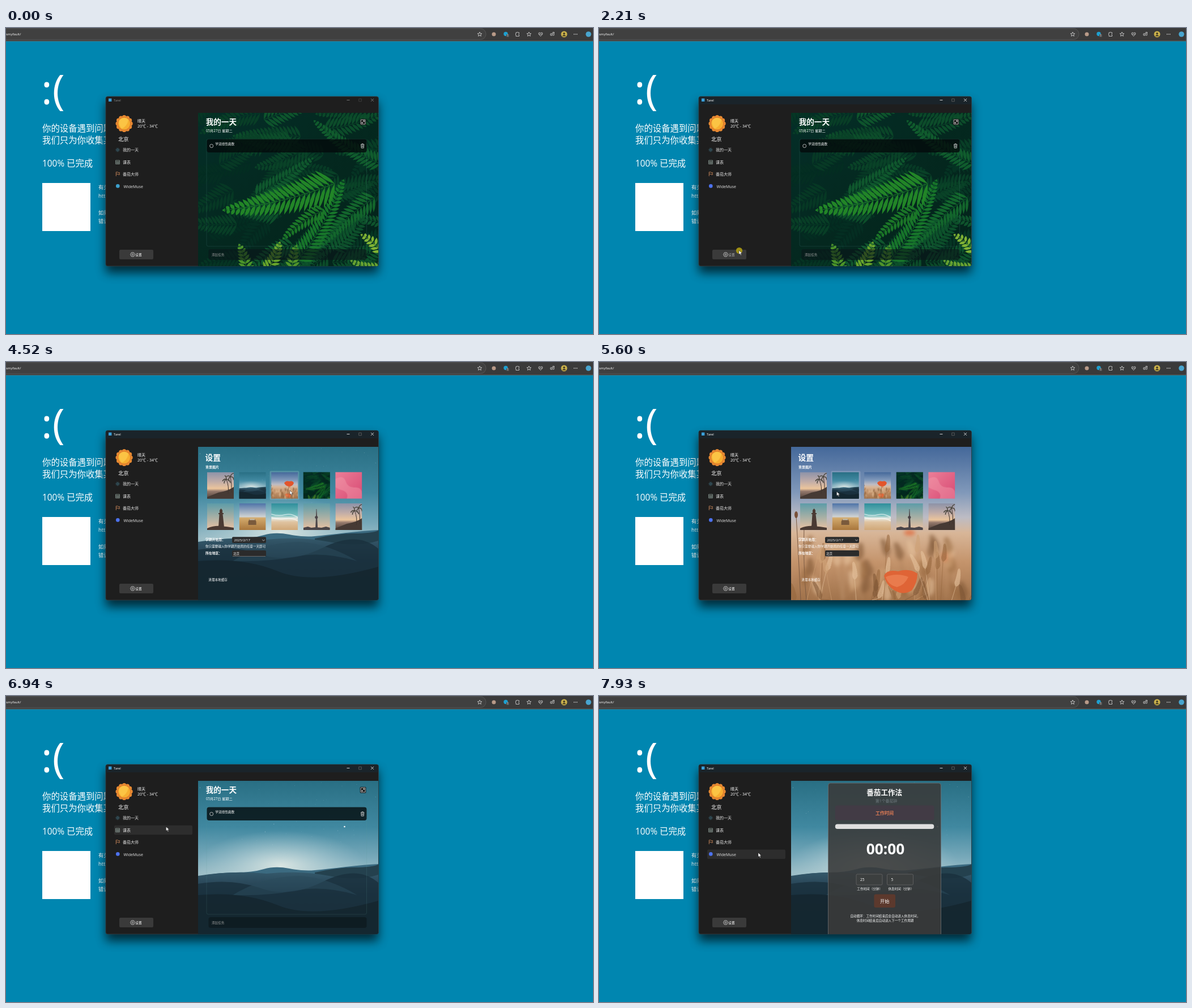
Write an HTML page that moves like this. It is 1036 px wide and 541 px high and loops after 8 s.

```html
<!DOCTYPE html>
<html lang="en">
<head>
<meta charset="utf-8">
<title>To-do app demo</title>
<style>
html, body { margin: 0; width: 100%; height: 100%; overflow: hidden; background: #0086b0; }
svg { display: block; }
#stage { width: 100%; height: 100%; font-family: "Open Sans", "Noto Sans CJK SC", "Noto Sans CJK", sans-serif; fill: #fff; }
text { white-space: pre; }
.b { font-weight: 700; }
.m { text-anchor: middle; }
.line { fill: none; stroke: #ddd; stroke-width: .8; }
.nav { font-size: 7px; fill: #e4e4e4; }
.small { font-size: 5.6px; }
.row { fill: #2d2d2d; }
.lit { fill: #fff; fill-opacity: .16; }
.soft { filter: blur(3px); }
.shadow { filter: blur(9px); }

.focus, .idle, .ai, .pressed, .fern, .fernThumb, .wheat, .lit, .row, .tap, .arrow {
  animation: 8s step-end infinite;
}
.focus { animation-name: focus; }
.idle { animation-name: idle; }
.ai { animation-name: ai; }
.pressed { animation-name: pressed; }
.fern { animation-name: fern; }
.fernThumb { animation-name: fernThumb; }
.wheat { animation-name: wheat; }
.lit2 { animation-name: lit2; }
.lit3 { animation-name: lit3; }
.row1 { animation-name: row1; }
.row2 { animation-name: row2; }
.row3 { animation-name: row3; }
.row4 { animation-name: row4; }
.tap { animation-name: tap; }
.arrow { animation-name: arrow; }
.day { animation: day 8s infinite; }
.settings { animation: settings 8s infinite; }
.table { animation: table 8s infinite; }
.timer { animation: timer 8s infinite; }
.pointer { animation: pointer 8s ease-in-out infinite; }

@keyframes focus { 0% { opacity: 0 } 1.1%, 100% { opacity: 1 } }
@keyframes idle { 0% { opacity: 1 } 1.1%, 100% { opacity: 0 } }
@keyframes ai { 0% { fill: #3ca0cc } 8%, 100% { fill: #4d72ee } }
@keyframes pressed { 0% { fill: #fff } 27.5% { fill: #aaa } 29.3%, 100% { fill: #fff } }
@keyframes fern { 0% { opacity: 1 } 46.5%, 100% { opacity: 0 } }
@keyframes fernThumb { 0% { opacity: 0 } 46.5%, 100% { opacity: 1 } }
@keyframes wheat { 0% { opacity: 0 } 59.1% { opacity: 1 } 71.5%, 100% { opacity: 0 } }
@keyframes lit2 { 0% { opacity: 0 } 42% { opacity: 1 } 50% { opacity: 0 } 69.6% { opacity: 1 } 73%, 100% { opacity: 0 } }
@keyframes lit3 { 0% { opacity: 0 } 50.6% { opacity: 1 } 64%, 100% { opacity: 0 } }
@keyframes row1 { 0% { opacity: 0 } 75% { opacity: 1 } 86.3%, 100% { opacity: 0 } }
@keyframes row2 { 0% { opacity: 0 } 86.3% { opacity: 1 } 93.5%, 100% { opacity: 0 } }
@keyframes row3 { 0% { opacity: 0 } 93.5% { opacity: 1 } 98%, 100% { opacity: 0 } }
@keyframes row4 { 0% { opacity: 0 } 98%, 100% { opacity: 1 } }
@keyframes arrow { 0% { opacity: 0 } 7.1%, 100% { opacity: 1 } }
@keyframes tap {
  0% { opacity: 0 } 27.5% { opacity: 1 } 29.3% { opacity: 0 }
  45.7% { opacity: 1 } 47.3% { opacity: 0 } 58.2% { opacity: 1 } 60% { opacity: 0 }
  70.4% { opacity: 1 } 72% { opacity: 0 } 77.6% { opacity: 1 } 79.2% { opacity: 0 }
  87% { opacity: 1 } 88.4% { opacity: 0 } 93.8% { opacity: 1 } 95.2%, 100% { opacity: 0 }
}
@keyframes day {
  0% { opacity: 1; transform: none; animation-timing-function: step-end }
  29.4% { opacity: 0; transform: translateY(40px); animation-timing-function: step-end }
  78.5% { opacity: 0; transform: translateY(40px); animation-timing-function: cubic-bezier(.1,.9,.2,1) }
  83% { opacity: 1; transform: none; animation-timing-function: step-end }
  87.5%, 100% { opacity: 0; transform: none }
}
@keyframes settings {
  0%, 29.4% { opacity: 0; transform: translateY(40px); animation-timing-function: cubic-bezier(.1,.9,.2,1) }
  34% { opacity: 1; transform: none; animation-timing-function: step-end }
  78.5%, 100% { opacity: 0; transform: none }
}
@keyframes table {
  0%, 87.5% { opacity: 0; transform: translateY(40px); animation-timing-function: cubic-bezier(.1,.9,.2,1) }
  90% { opacity: 1; transform: none; animation-timing-function: step-end }
  94.3%, 100% { opacity: 0; transform: none }
}
@keyframes timer {
  0%, 94.3% { opacity: 0; transform: translateY(40px); animation-timing-function: cubic-bezier(.1,.9,.2,1) }
  98%, 100% { opacity: 1; transform: none }
}
@keyframes pointer {
  0%, 7.1% { transform: translate(617px, 366px) }
  16.6%, 17.5% { transform: translate(258px, 334px) }
  20% { transform: translate(228px, 418px) }
  22.6%, 31% { transform: translate(247px, 393px) }
  44%, 49% { transform: translate(427px, 231px) }
  51.6%, 54.9% { transform: translate(497px, 223px) }
  56.4%, 63.2% { transform: translate(501px, 227px) }
  65%, 67.4% { transform: translate(458px, 227px) }
  67.5%, 69.2% { transform: translate(453px, 223px) }
  69.9%, 72% { transform: translate(419.5px, 229px) }
  75.9%, 86% { transform: translate(262px, 214px) }
  86.7%, 93.4% { transform: translate(282.5px, 231px) }
  93.7%, 97% { transform: translate(283px, 256px) }
  99%, 100% { transform: translate(281px, 277px) }
}
</style>
</head>
<body>
<svg id="stage" viewBox="0 0 1036 541" preserveAspectRatio="none">
<defs>
  <clipPath id="pane"><path d="M339 150H657V418q0 3-3 3H339z"/></clipPath>
  <linearGradient id="forest" x2="1" y2="1"><stop stop-color="#042e28"/><stop offset=".5" stop-color="#04281f"/><stop offset="1" stop-color="#03231a"/></linearGradient>
  <linearGradient id="dusk" x2="0" y2="1"><stop stop-color="#296f84"/><stop offset=".3" stop-color="#4088a0"/><stop offset=".5" stop-color="#78a9ba"/><stop offset=".6" stop-color="#9bbdc6"/></linearGradient>
  <radialGradient id="glow"><stop stop-color="#e8eee8" stop-opacity=".85"/><stop offset="1" stop-color="#b8d4da" stop-opacity="0"/></radialGradient>
  <linearGradient id="sand" x2="0" y2="1"><stop stop-color="#34586a"/><stop offset=".35" stop-color="#20394a"/><stop offset="1" stop-color="#15262f"/></linearGradient>
  <linearGradient id="field" x2="0" y2="1"><stop stop-color="#44689a"/><stop offset=".3" stop-color="#8199ba"/><stop offset=".46" stop-color="#bdbcc4"/><stop offset=".56" stop-color="#d8b698"/><stop offset=".75" stop-color="#c4946c"/><stop offset="1" stop-color="#a1734c"/></linearGradient>
  <linearGradient id="sunset" x2="0" y2="1"><stop stop-color="#8d93a8"/><stop offset=".35" stop-color="#c0aca8"/><stop offset=".62" stop-color="#ecc59c"/><stop offset=".72" stop-color="#94796c"/><stop offset="1" stop-color="#4d3f38"/></linearGradient>
  <linearGradient id="haze" x2="0" y2="1"><stop stop-color="#5d9ca8"/><stop offset="1" stop-color="#ecc2a2"/></linearGradient>
  <linearGradient id="rose" x2="1" y2="1"><stop stop-color="#ec7f98"/><stop offset="1" stop-color="#d84a74"/></linearGradient>
  <linearGradient id="plain" x2="0" y2="1"><stop stop-color="#4f74a8"/><stop offset=".5" stop-color="#cfd2d2"/><stop offset=".55" stop-color="#d3aa6c"/><stop offset="1" stop-color="#a8763c"/></linearGradient>
  <linearGradient id="sea" x2="0" y2="1"><stop stop-color="#2f8f9c"/><stop offset=".45" stop-color="#74bcbc"/><stop offset=".56" stop-color="#e8ebe4"/><stop offset=".7" stop-color="#dfc3a0"/><stop offset="1" stop-color="#d0a878"/></linearGradient>

  <g id="fern"><path fill="url(#forest)" d="M339 150h318v271H339z"/></g>
  <g id="dunes">
    <path fill="url(#dusk)" d="M339 150h318v271H339z"/>
    <ellipse cx="485" cy="300" rx="150" ry="62" fill="url(#glow)"/>
    <path fill="#3b6a80" d="M339 319Q375 312 405 312T455 306T500 305T545 308T600 302T657 297V350H339z"/>
    <path fill="#24414e" d="M545 312Q585 303 615 303T657 298V340H545z"/>
    <path fill="url(#sand)" d="M339 318Q400 308 460 314Q520 308 570 318T657 316V421H339z"/>
    <path fill="#1a303d" opacity=".8" d="M339 332Q400 322 450 340T560 328T657 330V421H339z"/>
    <path fill="#2b4b5b" opacity=".55" d="M400 352Q455 318 520 318Q570 322 620 352Q560 334 510 344T400 352z"/>
    <path fill="#13242d" opacity=".75" d="M339 352Q420 345 480 370T657 362V421H339z"/>
    <circle cx="597.5" cy="231" r="1.3" fill="#fff"/>
  </g>
  <g id="wheat">
    <path fill="url(#field)" d="M339 150h318v271H339z"/>
    <g class="soft" fill="#e06a3c">
      <ellipse cx="548" cy="302" rx="10" ry="5" opacity=".75"/><ellipse cx="614" cy="344" rx="8" ry="10" opacity=".6"/>
    </g>
    <path fill="none" stroke="#7a5a44" d="M348 272Q352 340 356 421M362 288Q360 360 366 421"/>
    <g fill="#79513a"><ellipse cx="348" cy="270" rx="3" ry="6"/><ellipse cx="362" cy="284" rx="3" ry="6"/></g>
  </g>
  <g id="palm">
    <path fill="url(#sunset)" d="M0 0h47v47H0z"/>
    <path fill="#463a34" d="M47 26Q38 33 20 36L0 44V47H47z"/>
    <path fill="none" stroke="#40332d" d="M37 38Q39 26 34 13M43 36Q44 22 41 8"/>
    <path fill="none" stroke="#4a463e" stroke-width="1.500" d="M27 16Q30 11 34 13Q40 13 41 19M34 13Q30 15 30 20M34 13Q34 8 31 6M34 8Q38 5 41 8Q47 8 47 14M41 8Q37 11 38 16M41 8Q43 2 47 2"/>
  </g>
  <g id="light">
    <path fill="url(#haze)" d="M0 0h47v47H0z"/>
    <path fill="#4a3a33" d="M20 42L21.500 19H20v-2h2v-5l2.500-3 2.500 3v5h2v2h-1.500L30 42zM0 44Q12 39 24 40T47 43V47H0z"/>
  </g>
  <g id="jeep">
    <path fill="url(#plain)" d="M0 0h47v47H0z"/>
    <path fill="#7a5a3c" d="M16 32l2-4h10l2 4v6H16z"/><path fill="#c6b9a0" d="M19 27h8l1 2.500H18z"/>
  </g>
  <g id="shore"><path fill="url(#sea)" d="M0 0h47v47H0z"/><path fill="none" stroke="#fff" stroke-width="1.500" opacity=".6" d="M0 19Q12 23 24 20T47 25M0 25Q14 29 25 27T47 31"/></g>
  <g id="spire">
    <path fill="url(#haze)" d="M0 0h47v47H0z"/>
    <path fill="#4b4548" d="M22.700 10h.8l.8 13 1 20h-4l1-20zM0 43l8-2 6 2 8-1 10 1 8-2 7 2v4H0z"/><circle cx="23" cy="24.500" r="2.600" fill="#4b4548"/>
  </g>
  <g id="pink"><path fill="url(#rose)" d="M0 0h47v47H0z"/><path fill="#f3a0ae" opacity=".4" d="M0 12Q14 4 18 16T34 27T47 37V47H20Q24 36 12 32T0 26z"/></g>
</defs>

<!-- page behind -->
<path fill="#0086b0" d="M0 0h1036v541H0z"/>
<path fill="#3a3a3a" d="M0 0h1036v23H0z"/>
<path fill="#6b5c52" d="M0 22.600h1036v.8H0z"/>
<rect x="-20" y="1" width="867" height="19.500" rx="9.700" fill="#404040" stroke="#5c5c5c" stroke-width=".8"/>
<text x="0" y="13.200" font-size="6">smyfault/</text>
<g class="line" stroke="#bbb" stroke-width=".7">
  <path id="star" d="M836 7.200l1.100 2.500 2.700.2-2.100 1.800.7 2.700-2.400-1.500-2.400 1.500.7-2.700-2.100-1.800 2.700-.2z"/>
  <use href="#star" x="87"/>
  <path d="M900 8h2q.8-2 1.800 0h1.700v2q-2 .8 0 2v2.500h-5.500V12q-2-1 0-2z"/>
  <path d="M943.500 14.500l-3.300-3.500q-.8-3 1.800-3l1.500 1.200 1.500-1.200q2.600 0 1.800 3zM941 11h5"/>
  <path d="M961 10h3v3h-3zM965 7.500h2.500v2.500H965zM965 13q3 .5 2.500-2"/>
</g>
<circle cx="861" cy="11" r="3.500" fill="#b89a88"/><circle cx="882" cy="10.500" r="3.700" fill="#1ea0d0"/>
<rect x="883" y="11" width="5" height="5" rx="1" fill="#555"/><text x="884.200" y="15.200" font-size="4.500">1</text>
<circle cx="985" cy="11" r="5.500" fill="#c9b04a"/><circle cx="985" cy="9.800" r="1.700" fill="#3a3424"/><path d="M981.500 14.500q3.500-5 7 0z" fill="#3a3424"/>
<circle cx="1002.600" cy="11" r=".7"/><circle cx="1005.200" cy="11" r=".7"/><circle cx="1007.800" cy="11" r=".7"/>
<circle cx="1028" cy="11" r="4.800" fill="#48a5cf"/>

<text x="62" y="135" font-size="74">:(</text>
<g font-size="15.400">
  <text x="64" y="182.600">你的设备遇到问题</text><text x="64" y="203.600">我们只为你收集某</text><text x="64" y="245">100% 已完成</text>
</g>
<path d="M64 274h85v85H64z"/>
<g font-size="9.300">
  <text x="163" y="284.700">有关</text><text x="163" y="299.500">http</text><text x="163" y="329.700">如果</text><text x="163" y="344.700">错误</text>
</g>

<!-- app window -->
<rect class="shadow" x="176" y="131" width="481" height="302" fill="#000" opacity=".68"/>
<rect x="176" y="121" width="481.500" height="300" rx="3.500" fill="#1e1e1e" stroke="#3c4448" stroke-width=".7"/>
<path class="focus" fill="#1a242a" d="M176.400 135V124q0-2.600 2.600-2.600H654.500q2.600 0 2.600 2.600V135z"/>
<rect x="181" y="124.600" width="5.400" height="5.400" fill="#3a9fd8"/>
<g id="caption" font-size="5.700"></g>

<g id="sun"></g>
<text x="232" y="167" font-size="7">晴天</text>
<text x="232" y="176.200" font-size="7">20℃ - 34℃</text>
<text x="198" y="200" font-size="9.300">北京</text>
<g id="rows"></g>
<g fill="none" stroke-width=".8">
  <g stroke="#4f8ea6"><circle cx="197" cy="215.500" r="1.600"/><circle cx="197" cy="215.500" r="3.200" stroke-dasharray="1 1.500"/></g>
  <path stroke="#8a9a94" d="M193.500 234h7v6.500h-7zM193.500 236h7M193.500 238.200h7M196 236v4.500M198.300 236v4.500"/>
  <path stroke="#d79060" d="M194.300 262v-7.200h3.200l.8 1h2.400l-1 1.700 1 1.700h-2.800l-.8-1h-2.800"/>
</g>
<circle class="ai" cx="197.300" cy="279.400" r="3.300"/>
<g class="nav">
  <text x="206" y="218.200">我的一天</text><text x="206" y="239.600">课表</text><text x="206" y="261">番茄大师</text><text x="207.500" y="282.500">WideMuse</text>
</g>
<rect x="200" y="392" width="60" height="17" rx="2" fill="#3a3a3a"/>
<path class="line" stroke="#fff" d="M221.500 397h4l2 3.500-2 3.500h-4l-2-3.500z"/><circle class="line" cx="223.500" cy="400.500" r="1.400"/>
<text class="pressed" x="228.300" y="402.700" font-size="5.700">设置</text>

<g clip-path="url(#pane)">
  <use href="#dunes"/><use class="fern" href="#fern"/><use class="wheat" href="#wheat"/>

  <g class="day">
    <text class="b" x="352.700" y="171.300" font-size="13.600">我的一天</text>
    <text x="353" y="183.700" font-size="6.200">05月27日 星期二</text>
    <rect x="624.800" y="160.800" width="10.600" height="10.600" rx="1.500" fill="#111"/>
    <path class="line" stroke="#fff" d="M626.200 162.200h7.800v7.800h-7.800zM628 168.200l4.300-4.300M630 163.900h2.300v2.300M628 166v2.200h2.200"/>
    <rect x="354" y="196.500" width="282.500" height="189.500" rx="3" fill="none" stroke="#5f9a94" stroke-opacity=".25" stroke-width=".7"/>
    <rect x="354.500" y="196.500" width="282" height="23.500" rx="4" fill="#040a0c" fill-opacity=".8"/>
    <circle class="line" cx="362.700" cy="208.500" r="3"/>
    <text x="369.300" y="207" font-size="5.650">学双线性函数</text>
    <path class="line" d="M626 206h6.400M628 206v-1.200h2.400v1.200M626.700 206.200l.5 6h4l.5-6M628.400 207.500v3.200M630 207.500v3.200"/>
    <rect x="357.500" y="391" width="279" height="19" rx="4" fill="#0b161a" fill-opacity=".6"/>
    <text class="small" x="363" y="402.700" fill="#9a9a9a">添加任务</text>
  </g>

  <g class="settings">
    <text class="b" x="351.500" y="173.600" font-size="13.800">设置</text>
    <text class="b" x="352" y="187.700" font-size="6">背景图片</text>
    <rect class="lit lit2" x="409.500" y="192.500" width="52" height="51" rx="2"/>
    <rect class="lit lit3" x="465.500" y="192.500" width="52" height="51" rx="2"/>
    <g id="thumbs"></g>
    <text class="b" x="352" y="316" font-size="5.800">学期开始周：</text>
    <rect x="399" y="309.300" width="60" height="10.700" rx="2" fill="#2b2b2b"/>
    <text x="402.500" y="317" font-size="6">2025/2/17</text><path class="line" d="M452.300 314l2.200 2.200 2.200-2.200"/>
    <text class="small" x="352" y="327.500">你只需要输入你学期开始周的任意一天即可</text>
    <text class="b" x="352" y="340.200" font-size="5.800">所在地区：</text>
    <rect x="399" y="333" width="60" height="11" rx="2" fill="#2b2b2b"/><path fill="#aaa" d="M400 343.500h58v.6h-58z"/>
    <text class="small" x="401" y="340.700">北京</text>
    <text class="small" x="357.300" y="386.500">清理本地缓存</text>
  </g>

  <g class="table"><text class="b" x="352.700" y="171.300" font-size="13.600">课表</text></g>

  <g class="timer">
    <rect x="404.500" y="154" width="199" height="275" rx="4" fill="#3a3b3b" fill-opacity=".9" stroke="#6d7274" stroke-width=".8"/>
    <text class="b m" x="503.700" y="174.700" font-size="12.600">番茄工作法</text>
    <text class="m" x="507" y="188" font-size="6.900" fill="#727c80">第1个番茄钟</text>
    <rect x="416.800" y="193.500" width="174.800" height="26" rx="4" fill="#423b45"/>
    <text class="b m" x="504" y="210" font-size="8" fill="#e07c55">工作时间</text>
    <rect x="416.800" y="226.500" width="174.500" height="8.600" rx="4" fill="#dedede"/>
    <text class="b m" x="505.500" y="279.800" font-size="26.300">00:00</text>
    <g fill="#3c3f3f" stroke="#6c6c6c" stroke-width=".7"><rect x="454" y="315" width="46" height="19" rx="2"/><rect x="508.500" y="315" width="46" height="19" rx="2"/></g>
    <text x="461" y="327" font-size="6.500">25</text><text x="515.500" y="327" font-size="6.500">5</text>
    <text class="small" x="455.300" y="342.600">工作时间（分钟）</text><text class="small" x="510.500" y="342.600">休息时间（分钟）</text>
    <rect x="485.500" y="350.500" width="37.500" height="23.500" rx="3" fill="#5c392d"/>
    <text class="m" x="504.200" y="365.600" font-size="8.200">开始</text>
    <g class="small m"><text x="505" y="391">自动循环：工作时间结束后会自动进入休息时间，</text><text x="505" y="398.600">休息时间结束后自动进入下一个工作周期</text></g>
  </g>
</g>

<g class="pointer"><g class="arrow">
  <circle class="tap" cx=".5" cy=".5" r="5.600" fill="#b5a312" fill-opacity=".85"/>
  <path fill="#fff" stroke="#111" stroke-width=".5" d="M0 0v7.600l1.800-1.600 1.300 2.900 1.300-.6-1.300-2.800h2.500z"/>
</g></g>
</svg>

<script>
const $ = id => document.getElementById(id);
const add = (id, markup) => $(id).insertAdjacentHTML('beforeend', markup);
const range = n => [...Array(n).keys()];
let seed = 11;
const rnd = (lo, hi) => lo + (hi - lo) * ((seed = seed * 16807 % 2147483647) / 2147483647);
const f = n => n.toFixed(1);

function leaf(x, y, a, len, w) {
  const c = Math.cos(a), s = Math.sin(a), k = len * .45;
  return `M${f(x)} ${f(y)}Q${f(x + c * k - s * w)} ${f(y + s * k + c * w)} ${f(x + c * len)} ${f(y + s * len)}` +
    `Q${f(x + c * k + s * w)} ${f(y + s * k - c * w)} ${f(x)} ${f(y)}`;
}

// A bent stem with paired leaflets that shorten towards the tip
function frond(x0, y0, x1, y1, bend, len, fill, w = 5, gap = 7, spread = .95) {
  const dx = x1 - x0, dy = y1 - y0, size = Math.hypot(dx, dy);
  const cx = (x0 + x1) / 2 - dy / size * bend, cy = (y0 + y1) / 2 + dx / size * bend;
  const n = Math.round(size / gap);
  let d = '';
  for (const i of range(n + 1)) {
    const t = i / n, u = 1 - t;
    const x = u * u * x0 + 2 * t * u * cx + t * t * x1, y = u * u * y0 + 2 * t * u * cy + t * t * y1;
    const a = Math.atan2(u * (cy - y0) + t * (y1 - cy), u * (cx - x0) + t * (x1 - cx));
    const l = len * u ** .6 + 2;
    for (const side of [-1, 1]) d += leaf(x, y, a + side * spread, l, w);
  }
  return `<path fill="${fill}" d="${d}"/><path fill="none" stroke="${fill}" stroke-width=".8" d="M${f(x0)} ${f(y0)}Q${f(cx)} ${f(cy)} ${f(x1)} ${f(y1)}"/>`;
}

// Dim undergrowth, greener towards the front and the right
add('fern', range(46).map(i => {
  const x = rnd(330, 670), y = rnd(145, 425), a = rnd(-.9, .2) + (i % 3 ? Math.PI : 0), size = rnd(70, 120);
  const glow = i / 46 * (x > 440 ? 1 : .5);
  const tone = `rgb(${f(3 + 12 * glow)},${f(44 + 44 * glow)},${f(33 + 12 * glow)})`;
  return frond(x - Math.cos(a) * size / 2, y - Math.sin(a) * size / 2,
    x + Math.cos(a) * size / 2, y + Math.sin(a) * size / 2, rnd(-12, 12), rnd(18, 28), tone);
}).join(''));

add('fern', [
  [660, 240, 545, 165, -12, 20, '#105c2d'],
  [650, 300, 555, 385, 10, 24, '#13662c'],
  [515, 410, 595, 270, 14, 26, '#17752a'],
  [580, 275, 385, 322, -14, 40, '#228527', 6.5, 9],
  [560, 322, 490, 372, 8, 18, '#1b7627'],
  [425, 430, 412, 384, 4, 15, '#4c9429'],
  [460, 430, 483, 380, 5, 17, '#68a42b'],
  [505, 430, 512, 386, -4, 15, '#50932a'],
  [662, 395, 628, 366, 5, 14, '#80b234'],
  [665, 425, 610, 412, -8, 12, '#68a232']
].map(p => frond(...p)).join(''));

add('dunes', range(45).map(() =>
  `<circle cx="${f(rnd(340, 656))}" cy="${f(rnd(151, 265))}" r="${f(rnd(.2, .5))}" fill="#e6f2f4" opacity="${f(rnd(.2, .8))}"/>`).join(''));

// Out-of-focus stalks behind, sharper ears in front
const ears = (n, size) => range(n).map(i => {
  const x = rnd(340, 660), y = rnd(302, 400), lean = rnd(-18, 18);
  const tone = ['#e6c49e', '#96683f', '#cfa277', '#7f5736'][i % 4];
  return `<g opacity=".6"><path fill="none" stroke="${tone}" d="M${f(x)} 421L${f(x + lean)} ${f(y + 30)}"/>` +
    frond(x + lean, y + 30, x + lean * 1.8, y, 2, size, tone, size / 3, 4, .45) + '</g>';
}).join('');
add('wheat', `<g class="soft">${ears(36, 15)}</g>` + ears(30, 9) +
  '<path fill="#df6436" d="M503 378Q508 366 528 370Q548 364 562 374Q562 390 552 404Q538 412 526 406Q508 398 503 378z"/>' +
  '<path fill="#f08a5c" opacity=".6" d="M506 380Q526 372 546 380Q540 394 526 398Q510 394 506 380z"/>');

// Title bar in its inactive and active state
for (const [state, tone, faint] of [['idle', '#8a8a8a', '#444'], ['focus', '#fff', '#666']])
  add('caption', `<g class="${state}" fill="${tone}"><text x="190" y="129.600">Tarel</text>
    <g fill="none" stroke="${tone}" stroke-width=".8"><path d="M601.500 127.500h5M644 124.900l5 5M649 124.900l-5 5"/>
    <path stroke="${faint}" d="M622.700 125.200h4.600v4.600h-4.600z"/></g></g>`);

add('sun', range(12).map(i => {
  const a = i * Math.PI / 6;
  return `<circle cx="${f(208.6 + 11.4 * Math.cos(a))}" cy="${f(169 + 11.4 * Math.sin(a))}" r="3.700" fill="#e88a32"/>`;
}).join('') + '<circle cx="208.600" cy="169" r="12" fill="#e07f2c"/><circle cx="208.600" cy="169" r="10.500" fill="#f6ae30"/><path fill="#fbc444" d="M200 163Q208 155 216 162Q214 174 204 178Q198 170 200 163z"/>');

add('rows', range(4).map(i =>
  `<rect class="row row${i + 1}" x="191" y="${f(207.3 + i * 21.4)}" width="138" height="16.500" rx="2"/>`).join(''));

const pics = ['palm', 'dunes', 'wheat', 'fern', 'pink', 'light', 'jeep', 'shore', 'spire', 'palm'];
add('thumbs', pics.map((pic, i) => {
  const wide = ['dunes', 'wheat', 'fern'].includes(pic);
  return `<svg class="${pic === 'fern' ? 'fernThumb' : ''}" x="${f(355 + i % 5 * 56.6)}" y="${i < 5 ? 194.7 : 250}" width="47" height="47"
    viewBox="${wide ? '339 150 318 271' : '0 0 47 47'}" preserveAspectRatio="xMidYMid slice"><use href="#${pic}"/></svg>`;
}).join('') + '<path fill="#e2552c" d="M491 214Q494 209 500 211Q506 209 508 214Q506 220 499 220Q493 219 491 214z"/><path fill="none" stroke="#8a6a48" stroke-width=".7" d="M499 220Q497 230 498 241"/>');
</script>
</body>
</html>
```
